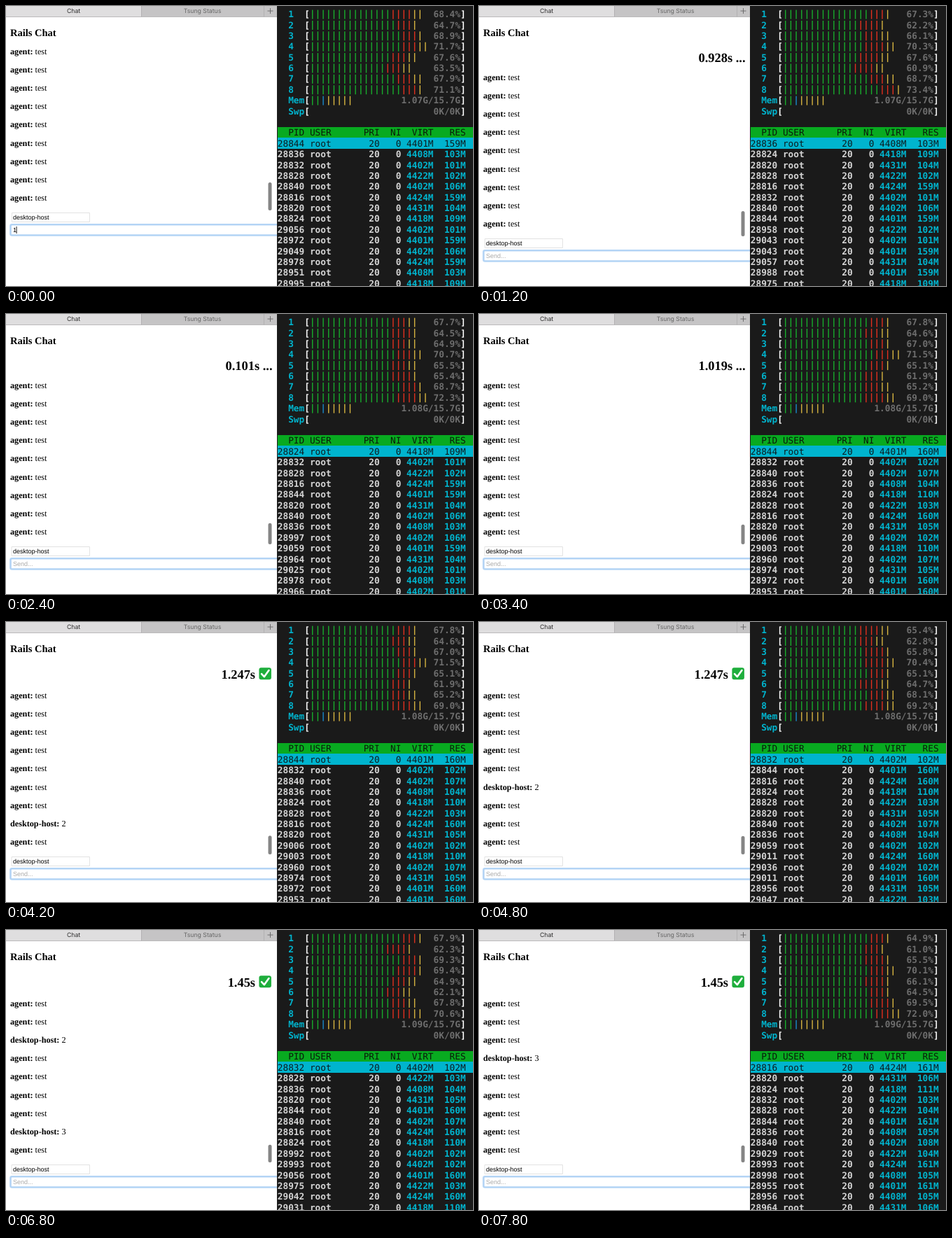
Animation, 667 px wide and 400 px high, one loop 8 s. Source, as an HTML page with a canvas:

```html
<!DOCTYPE html>
<html lang="en">
<head>
<meta charset="utf-8">
<title>Chat load test</title>
<style>
  html, body { margin: 0; width: 100%; height: 100%; overflow: hidden; background: #fff; }
  canvas { display: block; width: 667px; height: 400px; }
</style>
</head>
<body>
<canvas id="stage"></canvas>
<script>
const LOOP = 8000, STEP = 200;
const SERIF = '"Liberation Serif", serif';
const SANS = '"Liberation Sans", sans-serif';
const UI = 'Inter, sans-serif';
const MONO = '12.76px "DejaVu Sans Mono", monospace';
const CYAN = '#00b4ce', GREY = '#6e6e6e', LIGHT = '#d4d4d4', WHITE = '#f4f4f4', DARK = '#1a1a1a';
const BAR = { g: '#18ac2c', r: '#e0301f', y: '#d6b440', b: '#1a8acb' };

const canvas = document.getElementById('stage');
const ratio = window.devicePixelRatio || 1;
canvas.width = 667 * ratio;
canvas.height = 400 * ratio;
const ctx = canvas.getContext('2d');
ctx.scale(ratio, ratio);
if ('textRendering' in ctx) ctx.textRendering = 'geometricPrecision';

function box(x, y, w, h, color) {
  ctx.fillStyle = color;
  ctx.fillRect(x, y, w, h);
}

function pill(x, y, w, h, radius, color) {
  ctx.fillStyle = color;
  ctx.beginPath();
  ctx.roundRect(x, y, w, h, radius);
  ctx.fill();
}

function outline(x, y, w, h, color, width, radius = 0) {
  ctx.strokeStyle = color;
  ctx.lineWidth = width;
  ctx.beginPath();
  ctx.roundRect(x, y, w, h, radius);
  ctx.stroke();
}

function label(str, x, y, font, color = '#000', align = 'left') {
  ctx.font = font;
  ctx.fillStyle = color;
  ctx.textAlign = align;
  ctx.fillText(str, x, y);
  return ctx.measureText(str).width;
}

// Repeatable noise in 0..1.
function noise(a, b) {
  const s = Math.sin(a * 127.1 + b * 311.7 + 7) * 43758.5453;
  return s - Math.floor(s);
}

// ---- Chat window ----

const SELF = 'desktop-host', OTHER = 'agent';
const LINE = 26.1;

// Timer runs from origin at the given rate until done.
const posts = [
  { typed: 0, sent: 200, origin: 189, rate: 0.918, done: 1400, total: '1.102' },
  { typed: 2000, sent: 2400, origin: 2290, rate: 0.918, done: 3800, total: '1.247' },
  { typed: 5000, sent: 5200, origin: 5000, rate: 1.227, done: 6200, total: '1.45' }
];

// Log length over time, linear between these points.
const growth = [[0, 55], [1400, 63], [2400, 73], [3800, 81], [4800, 84], [6000, 85], [6200, 86], [7800, 91]];

function logLength(t) {
  const i = Math.max(1, growth.findIndex(([time]) => time >= t));
  const [t0, n0] = growth[i - 1], [t1, n1] = growth[i];
  return Math.floor(n0 + (n1 - n0) * (t - t0) / (t1 - t0) + 1e-6);
}

function tabs() {
  box(0, 0, 387, 15.5, '#c5c4c5');
  box(0, 0, 193, 15.5, '#dfdedf');
  box(193, 0, 0.8, 15.5, '#aeadae');
  box(368, 0, 0.8, 15.5, '#aeadae');
  box(0, 15, 387, 0.8, '#b2b1b2');
  label('Chat', 96.5, 10.3, `8.7px ${UI}`, '#2c2c2c', 'center');
  label('Tsung Status', 280.5, 10.3, `8.7px ${UI}`, '#656565', 'center');
  box(373.5, 6.6, 8, 0.9, '#666');
  box(377, 3, 0.9, 8, '#666');
}

function checkMark(x, y) {
  pill(x, y, 17.5, 17, 3, '#1eae3c');
  ctx.strokeStyle = '#fff';
  ctx.lineWidth = 2.6;
  ctx.lineCap = ctx.lineJoin = 'round';
  ctx.beginPath();
  ctx.moveTo(x + 3.6, y + 9);
  ctx.lineTo(x + 7.4, y + 13);
  ctx.lineTo(x + 14, y + 3.8);
  ctx.stroke();
}

function chat(t) {
  box(0, 0, 387, 400, '#fff');
  tabs();
  label('Rails Chat', 6, 43.4, `bold 14.5px ${SERIF}`);

  const current = posts.filter(p => t >= p.sent).pop();
  const done = current && t >= current.done;
  const shift = !current ? 0 : done ? 40 : 37;
  const timerFont = `bold 18.4px ${SERIF}`;
  if (done) {
    label(current.total + 's', 356, 81, timerFont, '#000', 'right');
    checkMark(361.4, 65.2);
  } else if (current) {
    const seconds = +((t - current.origin) * current.rate / 1000).toFixed(3);
    label(seconds + 's ...', 380.5, 80, timerFont, '#000', 'right');
  }

  const count = logLength(t);
  for (let i = 0; i < 9; i++) {
    const index = count - 9 + i;
    const post = posts.findIndex(p => t >= p.done && logLength(p.done) - 1 === index);
    const y = 69 + shift + i * LINE;
    const w = label((post < 0 ? OTHER : SELF) + ':', 6, y, `bold 12.2px ${SERIF}`);
    label(post < 0 ? 'test' : String(post + 1), 6 + w + 3, y, `12.2px ${SERIF}`);
  }

  const thumb = 2200 / count;
  pill(374.5, 292 + shift - thumb, 5, thumb, 2.5, '#858585');

  outline(8.5, 295.5 + shift, 111, 13, '#e2e2e2', 1);
  label(SELF, 10, 305.3 + shift, `9px ${SANS}`);
  outline(6.5, 312.3 + shift, 400, 15.2, '#b3d4f5', 2.6, 2);
  const draft = posts.findIndex(p => t >= p.typed && t < p.sent);
  const y = 323 + shift;
  if (draft < 0) {
    label('Send...', 10, y, `9px ${SANS}`, '#a9a9a9');
  } else {
    label(String(draft + 1), 10, y, `9px ${SANS}`);
    box(14.6, 315 + shift, 0.9, 10, '#000');
  }
}

// ---- Process monitor ----

const LEFT = 387.8, COL = 7.68, ROW = 15.38;
const CORES = 8, WORKERS = 8, ROWS = 14;
const REFRESH = 1500, PHASE = 1300;

function put(col, row, str, color, bold = true) {
  ctx.font = (bold ? 'bold ' : '') + MONO;
  ctx.fillStyle = color;
  ctx.textAlign = 'left';
  [...str].forEach((ch, i) => {
    if (ch !== ' ') ctx.fillText(ch, LEFT + (col + i) * COL, 16.2 + row * ROW);
  });
}

function meter(row, name, bars, value) {
  put(2, row, name, CYAN);
  put(5, row, '[', WHITE);
  [...bars].forEach((c, i) => {
    box(LEFT + (6.5 + i) * COL - 0.7, 5.6 + row * ROW, 1.4, 13, BAR[c]);
  });
  put(34 - value.length, row, value, GREY);
  put(34, row, ']', WHITE);
}

// Every fourth core runs lighter; user time is green, system red, the rest yellow.
function core(i, n) {
  const load = 67 - 4 * Math.cos((i - 1) * Math.PI / 2) + 5 * (noise(i, n) - 0.5);
  const total = Math.ceil(load * 0.28) + 1;
  const system = noise(i, n + 20) > 0.7 ? 4 : 3;
  const other = noise(i, n + 40) > 0.55 ? 2 : 1;
  const bars = 'g'.repeat(total - system - other) + 'r'.repeat(system) + 'y'.repeat(other);
  meter(i, String(i + 1), bars, load.toFixed(1) + '%');
}

// The workers lead the list in changing order, followed by some of their threads.
function processes(n) {
  const order = [...Array(WORKERS).keys()].sort((a, b) => noise(a, n) - noise(b, n));
  return Array.from({ length: ROWS }, (_, i) => {
    const isWorker = i < WORKERS;
    const slot = isWorker ? order[i] : Math.floor(noise(i, n) * WORKERS);
    const pid = isWorker ? 28816 + slot * 4 : 28948 + Math.floor(noise(i, n + 60) * 112);
    const virt = 4397 + Math.floor(noise(slot, 3) * 42);
    const heavy = slot % (WORKERS - 1) === 0;
    const res = (heavy ? 159 : 101 + Math.floor(noise(slot, 5) * 9)) + Math.floor(n / 3);
    return { pid, virt, res };
  });
}

function monitor(t) {
  const n = Math.floor((t + PHASE) / REFRESH);
  box(387, 0, 280, 400, DARK);

  for (let i = 0; i < CORES; i++) core(i, n);
  meter(8, 'Mem', 'ggbyyyyy', (1.069 + n * 0.0035).toFixed(2) + 'G/15.7G');
  meter(9, 'Swp', '', '0K/0K');

  box(388, 173, 279, 15, '#08aa20');
  box(388, 188, 279, 16, CYAN);
  put(0, 11, '  PID USER      PRI  NI  VIRT   RES', '#0a1a0a', false);

  processes(n).forEach(({ pid, virt, res }, i) => {
    const picked = i === 0, row = 12 + i;
    put(0, row, pid + ' root       20   0', picked ? '#0c1c20' : LIGHT, !picked);
    put(24, row, `${virt}M  ${res}M`, picked ? '#0c1c20' : CYAN, !picked);
  });
}

let shown = -1;
function frame() {
  const t = Math.floor(performance.now() % LOOP / STEP) * STEP;
  if (t !== shown) {
    shown = t;
    chat(t);
    monitor(t);
  }
  requestAnimationFrame(frame);
}
frame();
</script>
</body>
</html>
```
